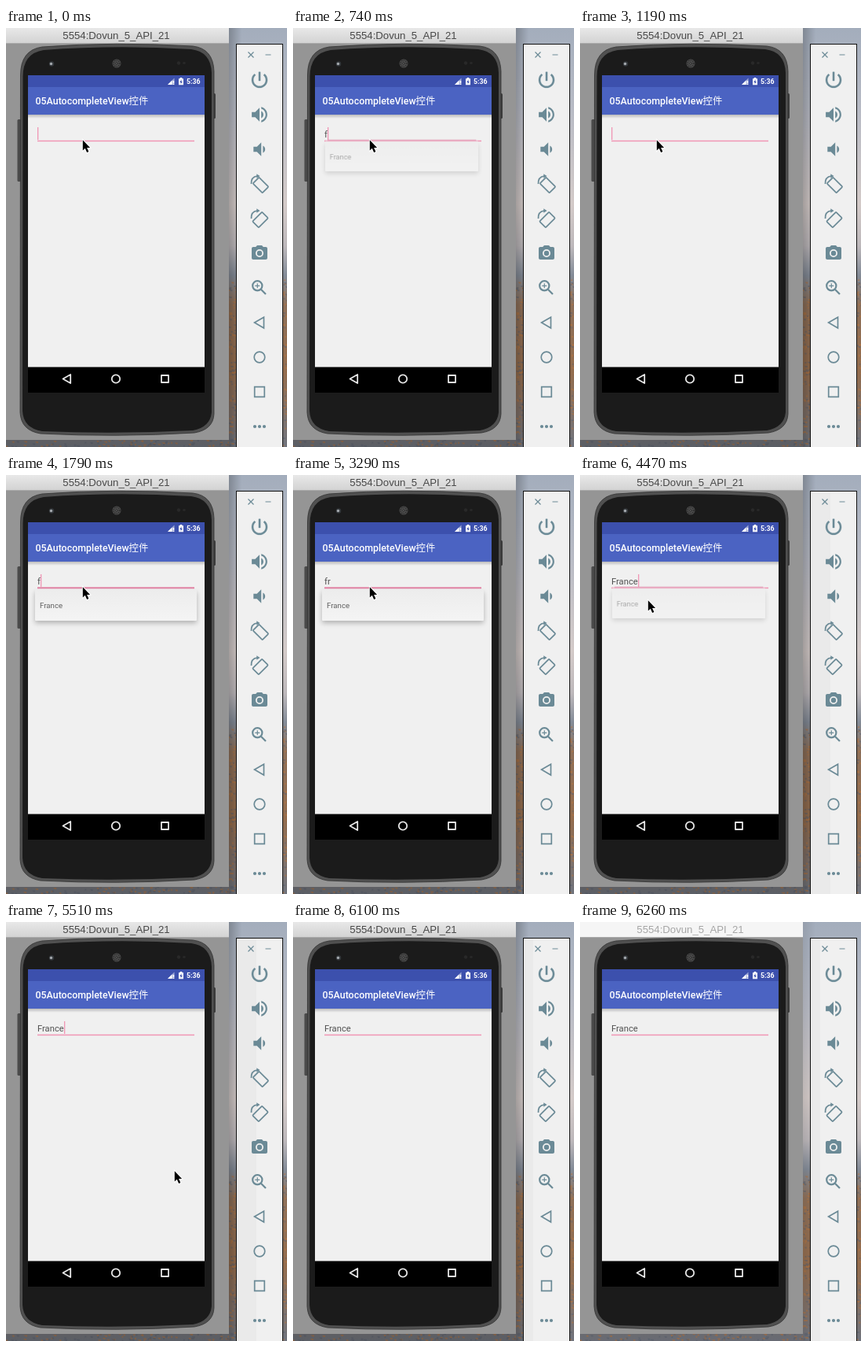
An HTML page that plays this animation: 358 px wide and 532 px high, repeating every 6360 ms.

```html
<!DOCTYPE html>
<html lang="zh">
<head>
<meta charset="utf-8">
<title>AutocompleteView</title>
<style>
html, body { margin: 0; width: 100%; height: 100%; overflow: hidden; background: #888; }
svg { display: block; width: 358px; height: 532px; }
text { font-family: Roboto, "Noto Sans CJK SC", "Noto Sans CJK", sans-serif; white-space: pre; }
.win-title { font: 13.2px "Liberation Sans", Arial, sans-serif; }
.line { fill: none; stroke: #6b8a96; stroke-width: 1.7; }
.thin { stroke-width: 1.2; }
.thick { stroke-width: 2.2; }
.solid { fill: #6b8a96; }
.nav { fill: none; stroke: #e6e6e6; stroke-width: 1.8; }

.anim { animation: 6360ms step-end infinite; }
.one { animation-name: one; }
.two { animation-name: two; }
.full { animation-name: full; }
.caret { animation-name: caret; }
.popup { animation-name: popup; transform-origin: 112px 126px; }
.mouse { animation-name: mouse; }
.blur { animation-name: blur; }
.shade { animation-name: shade; }
.tint { animation-name: tint; }

@keyframes one {
  0% { opacity: 0; }
  11.63% { opacity: 1; }
  16.35% { opacity: 0; }
  25.78% { opacity: 1; }
  44.65%, 100% { opacity: 0; }
}
@keyframes two {
  0% { opacity: 0; }
  44.65% { opacity: 1; }
  70.28%, 100% { opacity: 0; }
}
@keyframes full {
  0% { opacity: 0; }
  70.28%, 100% { opacity: 1; }
}
@keyframes caret {
  0% { transform: translateX(0); opacity: 1; }
  6.91% { transform: translateX(0); opacity: 0; }
  11.63% { transform: translateX(4px); opacity: 1; }
  16.35% { transform: translateX(0); opacity: 1; }
  25.78% { transform: translateX(4px); opacity: 1; }
  32.86% { transform: translateX(4px); opacity: 0; }
  39.93% { transform: translateX(4px); opacity: 1; }
  44.65% { transform: translateX(7.6px); opacity: 1; }
  51.72% { transform: translateX(7.6px); opacity: 0; }
  61% { transform: translateX(7.6px); opacity: 1; }
  70.28% { transform: translateX(34px); opacity: 1; }
  77.35% { transform: translateX(34px); opacity: 0; }
  84.27% { transform: translateX(34px); opacity: 1; }
  91.35%, 100% { transform: translateX(34px); opacity: 0; }
}
@keyframes popup {
  0% { opacity: 0; transform: scale(.947); }
  11.63% { opacity: .5; transform: scale(.947); }
  13.99% { opacity: 1; transform: none; }
  16.35% { opacity: .5; transform: scale(.947); }
  18.71% { opacity: 0; transform: scale(.947); }
  25.78% { opacity: .5; transform: scale(.947); }
  28.14% { opacity: 1; transform: none; }
  70.28% { opacity: .5; transform: scale(.947); }
  72.64%, 100% { opacity: 0; transform: scale(.947); }
}
@keyframes mouse {
  0% { transform: translate(97px, 141px); }
  61% { transform: translate(94px, 146px); }
  63.36% { transform: translate(89px, 153px); }
  65.72% { transform: translate(86px, 158px); }
  81.91% { transform: translate(104px, 180px); }
  84.27% { transform: translate(162px, 250px); }
  86.63% { transform: translate(214px, 315px); }
  88.99% { transform: translate(248px, 384px); }
  91.35% { transform: translate(270px, 450px); }
  93.71% { transform: translate(284px, 508px); }
  95.91%, 100% { transform: translate(290px, 560px); }
}
@keyframes blur {
  0% { opacity: 0; }
  98.42%, 100% { opacity: 1; }
}
@keyframes shade {
  0% { opacity: 1; }
  98.42%, 100% { opacity: .4; }
}
@keyframes tint {
  0% { opacity: 0; transform: none; }
  70.28% { opacity: 1; transform: none; }
  95.91%, 100% { opacity: 1; transform: translateX(-13px); }
}
</style>
</head>
<body>
<svg viewBox="0 0 358 532">
  <defs>
    <linearGradient id="sky" x2="0" y2="1">
      <stop offset="0" stop-color="#a3adbc"/>
      <stop offset=".2" stop-color="#b8bbc5"/>
      <stop offset=".42" stop-color="#d3cac8"/>
      <stop offset=".52" stop-color="#bdb8bb"/>
      <stop offset=".59" stop-color="#838b97"/>
      <stop offset=".66" stop-color="#8e7059"/>
      <stop offset=".82" stop-color="#936c4d"/>
      <stop offset="1" stop-color="#70747d"/>
    </linearGradient>
    <linearGradient id="bar" x2="0" y2="1">
      <stop offset="0" stop-color="#e8e8e8"/>
      <stop offset="1" stop-color="#d3d3d3"/>
    </linearGradient>
    <linearGradient id="right">
      <stop offset="0" stop-opacity=".22"/>
      <stop offset="1" stop-opacity="0"/>
    </linearGradient>
    <linearGradient id="down" x2="0" y2="1">
      <stop offset="0" stop-opacity=".22"/>
      <stop offset="1" stop-opacity="0"/>
    </linearGradient>
    <linearGradient id="card" x2="0" y2="1">
      <stop offset="0" stop-color="#ececec"/>
      <stop offset="1" stop-color="#f4f4f4"/>
    </linearGradient>
    <filter id="soft" x="-10%" y="-40%" width="120%" height="180%">
      <feGaussianBlur stdDeviation="3.2"/>
    </filter>
  </defs>

  <!-- desktop -->
  <rect width="358" height="532" fill="url(#sky)"/>
  <path id="leaves" fill="#b5733f" opacity=".6"/>
  <path id="dusk" fill="#596170" opacity=".5"/>
  <g class="anim shade">
    <rect x="284" width="16" height="532" fill="url(#right)"/>
    <rect y="522" width="284" height="10" opacity=".18"/>
  </g>

  <!-- emulator window -->
  <rect y="10" width="284" height="513" fill="#959595"/>
  <rect width="284" height="19" fill="url(#bar)"/>
  <rect y="19" width="284" height="1" fill="#a9a9a9"/>
  <text class="win-title" x="140.5" y="14.3" text-anchor="middle" fill="#484848">5554:Dovun_5_API_21</text>
  <g class="anim blur">
    <rect width="284" height="19" fill="#f5f5f5"/>
    <text class="win-title" x="140.5" y="14.3" text-anchor="middle" fill="#a6a6a6">5554:Dovun_5_API_21</text>
  </g>

  <!-- phone -->
  <rect x="14.5" y="116" width="5" height="79" rx="1.5" fill="#4b4b4b"/>
  <rect x="263" y="83" width="4" height="32" rx="1.5" fill="#3c3c3c"/>
  <path d="M18.500 60Q18.500 28 46 24Q140 17 238 23Q264 26 265 55V490Q264 510 240 514Q140 520 44 515Q19 511 18 488Z" fill="#505050" stroke="#333" stroke-width=".8"/>
  <path d="M21.500 62Q21.500 32 48 28Q140 21 236 27Q261 30 262 57V488Q260 507 238 511Q140 516 46 512Q22 508 21 486Z" fill="#1b1b1b"/>
  <circle cx="58" cy="45.500" r="3.200" fill="#34383c"/>
  <circle cx="57.500" cy="45.500" r="1.700" fill="#a4a9ae"/>
  <circle cx="141" cy="45" r="5.500" fill="#4b4b4b"/>
  <circle cx="141" cy="45" r="4" fill="none" stroke="#222" stroke-width="1.200" stroke-dasharray="1.200 1.400"/>
  <circle cx="141" cy="45" r="1.600" fill="none" stroke="#222" stroke-dasharray="1 1"/>
  <circle cx="220" cy="44.500" r="2.200" fill="#292929"/>
  <circle cx="227" cy="44.500" r="1.800" fill="#282828"/>

  <!-- app screen -->
  <rect x="28" y="60" width="225" height="403" fill="#f0f0f0"/>
  <rect x="28" y="60" width="225" height="15" fill="#3c50ad"/>
  <rect x="28" y="75" width="225" height="35" fill="#4b63c2"/>
  <rect x="28" y="110" width="225" height="5" fill="url(#down)"/>
  <path d="M206 72L214.500 63.500V72Z" fill="#fff" opacity=".5"/>
  <path d="M206 72L211.500 66.500V72ZM212.600 67h1.600v3h-1.600zM212.600 70.800h1.600V72h-1.600z" fill="#fff"/>
  <path d="M220 64.300h1.700V63h2.600v1.300H226V72.300H220Z" fill="#fff"/>
  <path d="M223.500 65.500L221.300 69h1.400v2.300L224.800 68h-1.300Z" fill="#3c50ad"/>
  <text x="230" y="71.200" font-size="8.800" font-weight="700" fill="#fff">5:36</text>
  <text x="37.500" y="97" font-size="12.400" font-weight="500" fill="#fff">05AutocompleteView控件</text>

  <rect x="40" y="142.700" width="200" height="1.500" fill="#f096b5"/>
  <g font-size="11.200" fill="#515151">
    <text class="anim one" x="40" y="138.500">f</text>
    <text class="anim two" x="40" y="138.500">fr</text>
    <text class="anim full" x="40" y="138.500">France</text>
  </g>
  <rect class="anim caret" x="40" y="126" width="1.300" height="16" fill="#f096b5"/>

  <g class="anim popup">
    <rect x="37" y="149" width="206" height="39" opacity=".26" filter="url(#soft)"/>
    <rect x="37" y="144" width="206" height="41" rx="1" fill="url(#card)"/>
    <text x="43" y="168.800" font-size="9.700" fill="#606060">France</text>
    <rect x="40" y="142.500" width="200" height="1.800" fill="#de7c9e"/>
  </g>

  <rect x="28" y="430.500" width="225" height="32.500"/>
  <path class="nav" d="M82.200 440V451L72.500 445.500ZM198 441h9v9H198Z" stroke-linejoin="round"/>
  <circle class="nav" cx="140" cy="445.500" r="5.200"/>

  <!-- side toolbar -->
  <rect x="293.500" y="20.500" width="59" height="520" fill="#f0f0f0" stroke="#111"/>
  <svg x="294" y="21" width="58" height="511" style="width:58px;height:511px">
    <rect class="anim tint" width="25" height="511" fill-opacity=".025"/>
  </svg>
  <path class="line thin" d="M308.500 30.500l7 7m0-7l-7 7M330.500 34h7"/>
  <g class="solid">
    <path transform="translate(309.600 52.500) scale(1.120)" stroke="#6b8a96" stroke-width=".3" d="M13 3h-2v10h2V3zm4.830 2.170l-1.420 1.420C17.990 7.860 19 9.810 19 12c0 3.870-3.130 7-7 7s-7-3.130-7-7c0-2.190 1.010-4.140 2.580-5.420L6.170 5.170C4.230 6.820 3 9.260 3 12c0 4.970 4.030 9 9 9s9-4.030 9-9c0-2.740-1.230-5.180-3.170-6.830z"/>
    <path transform="translate(309.800 96.800) scale(1.100)" d="M3 9v6h4l5 5V4L7 9H3zm13.500 3c0-1.770-1.020-3.290-2.500-4.030v8.050c1.480-.73 2.500-2.250 2.500-4.020zM14 3.230v2.060c2.890.86 5 3.540 5 6.710s-2.110 5.850-5 6.710v2.060c4.010-.91 7-4.490 7-8.770s-2.990-7.860-7-8.770z"/>
    <path transform="translate(309.800 140.800) scale(1.100)" d="M18.500 12c0-1.770-1.020-3.290-2.500-4.030v8.050c1.480-.73 2.500-2.250 2.500-4.020zM5 9v6h4l5 5V4L9 9H5z"/>
    <path transform="translate(311 274)" fill-rule="evenodd" d="M9 2L7.170 4H4c-1.100 0-2 .9-2 2v12c0 1.100.9 2 2 2h16c1.100 0 2-.9 2-2V6c0-1.100-.9-2-2-2h-3.170L15 2H9zm3 15a5 5 0 1 1 0-10 5 5 0 0 1 0 10zm0-1.800a3.200 3.200 0 1 0 0-6.400 3.200 3.200 0 0 0 0 6.400z"/>
    <circle cx="317" cy="506" r="2.100"/>
    <circle cx="323" cy="506" r="2.100"/>
    <circle cx="329" cy="506" r="2.100"/>
  </g>
  <rect class="line" x="-5.500" y="-8.500" width="11" height="17" rx="1" transform="translate(324.500 199.500) rotate(-45)"/>
  <rect class="line" x="-5.500" y="-8.500" width="11" height="17" rx="1" transform="translate(324 243.500) rotate(45)"/>
  <g id="arrow">
    <path class="line" d="M312.500 198Q312 189 320 188"/>
    <path class="solid" d="M319.300 185.200L323.500 188 319.300 190.800Z"/>
  </g>
  <use href="#arrow" y="44"/>
  <circle class="line thick" cx="320.300" cy="327.300" r="6.100"/>
  <path class="line thick" d="M325 332l6 6"/>
  <path class="line thin" d="M317.300 327.300h6m-3-3v6"/>
  <path class="line" d="M328.500 367.200V381L316.600 374.100ZM316.700 455.700h12.600v12.600h-12.600Z"/>
  <circle class="line" cx="323" cy="418" r="6.800"/>

  <g class="anim mouse">
    <path d="M.8 1.200V14.600l3-2.800 2.300 5.200 2.300-1-2.300-5.100h4Z" stroke="#fff" stroke-width="1.800" paint-order="stroke"/>
  </g>
</svg>
<script>
// Seeded flecks of foliage on the desktop.
let seed = 7;
const rnd = () => (seed = seed * 16807 % 2147483647) / 2147483647;
function flecks(id, count) {
  let d = "";
  for (let i = 0; i < count; i++) {
    const low = i % 3 === 0;
    const x = low ? rnd() * 290 : (i % 3 === 1 ? 283 : 352) + rnd() * 9;
    const y = low ? 522 + rnd() * 9 : 318 + rnd() * 212;
    d += `M${x.toFixed(1)} ${y.toFixed(1)}h${(1 + rnd() * 4).toFixed(1)}v2h-2z`;
  }
  document.getElementById(id).setAttribute("d", d);
}
flecks("leaves", 150);
flecks("dusk", 130);
</script>
</body>
</html>
```
